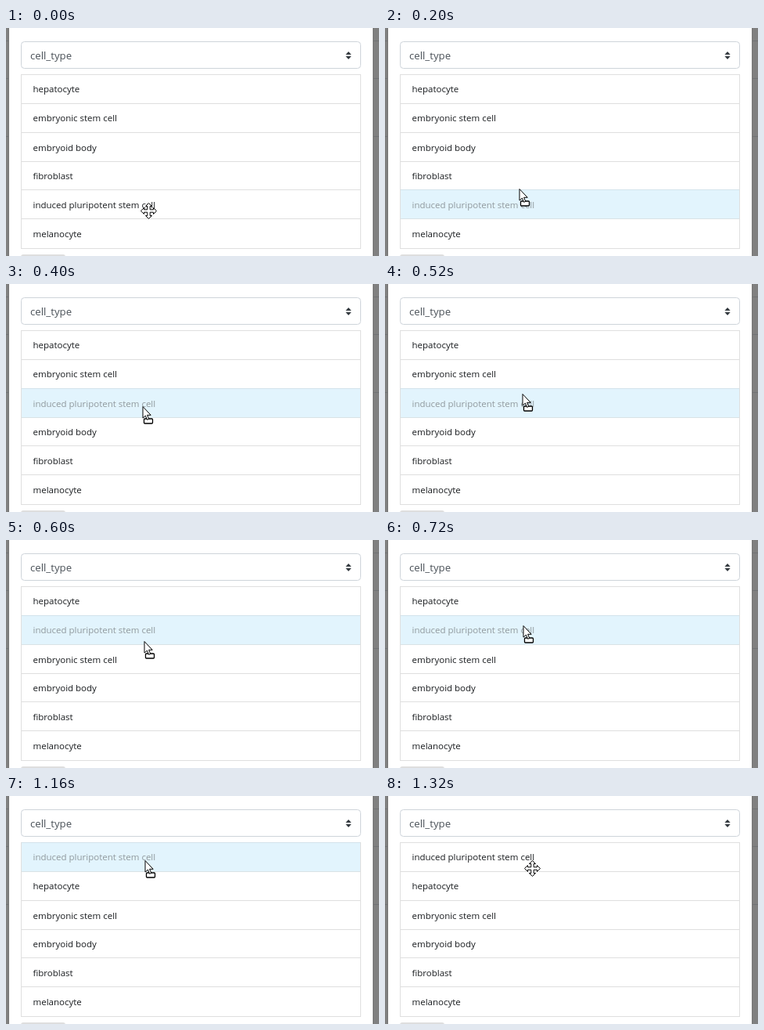
An HTML page with a canvas for the animation above (1360 ms loop, 477 px wide and 291 px high).

```html
<!DOCTYPE html>
<html lang="en">
<head>
<meta charset="utf-8">
<title>Sortable list</title>
<style>
  html, body { margin: 0; width: 100%; height: 100%; overflow: hidden; background: #fff; }
  canvas { display: block; }
</style>
</head>
<body>
<canvas id="stage" width="477" height="291"></canvas>
<script>
const ctx = document.getElementById('stage').getContext('2d');
const LOOP = 1360, STEP = 40;
const DRAG_START = 120, DRAG_END = 1240;
const LEFT = 19, WIDTH = 435;
const EDGES = [59, 96, 133, 170, 206, 243, 281];
const BASELINES = [82, 119, 157, 193, 230, 267];
const DRAGGED = 'induced pluripotent stem cell';
const OTHERS = ['hepatocyte', 'embryonic stem cell', 'embryoid body', 'fibroblast', 'melanocyte'];
const LINE = '#dfdfdf';

// Pointer hotspot: time, x, y
const PATH = [
  [0, 172, 224], [120, 172, 220], [200, 172, 206], [400, 175, 157],
  [600, 177, 130], [880, 178, 84], [1160, 178, 83], [1360, 178, 83]
];

function pointerAt(t) {
  const i = PATH.findIndex((p, k) => k > 0 && t <= p[0]);
  const [t0, x0, y0] = PATH[i - 1], [t1, x1, y1] = PATH[i];
  const k = (t - t0) / (t1 - t0);
  return { x: Math.round(x0 + (x1 - x0) * k), y: Math.round(y0 + (y1 - y0) * k) };
}

function rect(x, y, w, h, color) {
  ctx.fillStyle = color;
  ctx.fillRect(x, y, w, h);
}

function text(str, x, y, size, color) {
  ctx.font = `${size}px "Open Sans", "Noto Sans", sans-serif`;
  ctx.fillStyle = color;
  ctx.fillText(str, x, y);
}

function polygon(points) {
  ctx.beginPath();
  points.forEach(([x, y]) => ctx.lineTo(x, y));
  ctx.closePath();
}

function paint(fill, stroke) {
  ctx.fillStyle = fill;
  ctx.fill();
  if (!stroke) return;
  ctx.strokeStyle = stroke;
  ctx.stroke();
}

function roundBox(x, y, w, h, r, fill, stroke) {
  ctx.beginPath();
  ctx.roundRect(x, y, w, h, r);
  paint(fill, stroke);
}

function drawDialog() {
  rect(0, 0, 477, 291, '#808080');
  for (const y of [16, 64, 138]) rect(0, y, 477, 1, '#707274');
  rect(3, 0, 467, 291, '#777');
  rect(4, 0, 465, 291, '#fff');
  ctx.lineWidth = 1;
  roundBox(19.5, 17.5, 434, 34, 4, '#fff', '#ced4da');
  text('cell_type', 31, 39.5, 13.2, '#495057');
  polygon([[438, 30], [441.6, 34], [434.4, 34]]);
  paint('#343a40');
  polygon([[438, 40], [441.6, 36], [434.4, 36]]);
  paint('#343a40');
  roundBox(19, 289, 57, 10, 3, '#dedede');
}

function drawList(slot, dragging) {
  const items = [...OTHERS];
  items.splice(slot, 0, DRAGGED);
  const top = EDGES[slot], bottom = EDGES[slot + 1];
  for (const y of EDGES) rect(LEFT, y, WIDTH, 1, LINE);
  if (dragging) {
    rect(LEFT, top, WIDTH, bottom - top, '#e2f4fd');
    rect(LEFT, top, WIDTH, 1, '#d3e3eb');
    rect(LEFT, bottom, WIDTH, 1, '#d9e2e6');
  }
  for (const x of [LEFT, LEFT + WIDTH - 1]) rect(x, EDGES[0], 1, EDGES[6] - EDGES[0] + 1, LINE);
  items.forEach((name, i) => {
    const faded = dragging && i === slot;
    text(name, 34.5, BASELINES[i], 11.5, faded ? '#90999d' : '#191c1f');
  });
}

function drawDragCursor({ x, y }) {
  ctx.save();
  ctx.translate(x, y - 0.5);
  ctx.lineWidth = 1.3;
  roundBox(1.5, 15.5, 11, 6, 1, '#fff', '#000');
  ctx.lineWidth = 1;
  polygon([[0, 0], [0, 14.6], [3.4, 11.6], [5.6, 16.8], [7.8, 15.9], [5.6, 10.8], [10.2, 10.8]]);
  paint('#fff', '#000');
  ctx.restore();
}

function drawMoveCursor({ x, y }) {
  const arm = [[-1.7, -1.7], [-1.7, -6], [-4, -6], [0, -10], [4, -6], [1.7, -6]];
  const points = [];
  for (let q = 0; q < 4; q++) {
    for (let [px, py] of arm) {
      for (let r = 0; r < q; r++) [px, py] = [-py, px];
      points.push([px, py]);
    }
  }
  ctx.save();
  ctx.translate(x + 10.5, y + 9.5);
  ctx.lineWidth = 1;
  polygon(points);
  paint('#fff', '#000');
  ctx.restore();
}

function draw(now) {
  const t = Math.floor((now % LOOP) / STEP) * STEP;
  const pointer = pointerAt(t);
  const dragging = t >= DRAG_START && t < DRAG_END;
  const hovered = EDGES.findLastIndex(y => y <= pointer.y);
  drawDialog();
  drawList(Math.min(4, hovered), dragging);
  (dragging ? drawDragCursor : drawMoveCursor)(pointer);
}

const start = performance.now();
function tick() {
  draw(performance.now() - start);
  requestAnimationFrame(tick);
}
tick();
</script>
</body>
</html>
```
